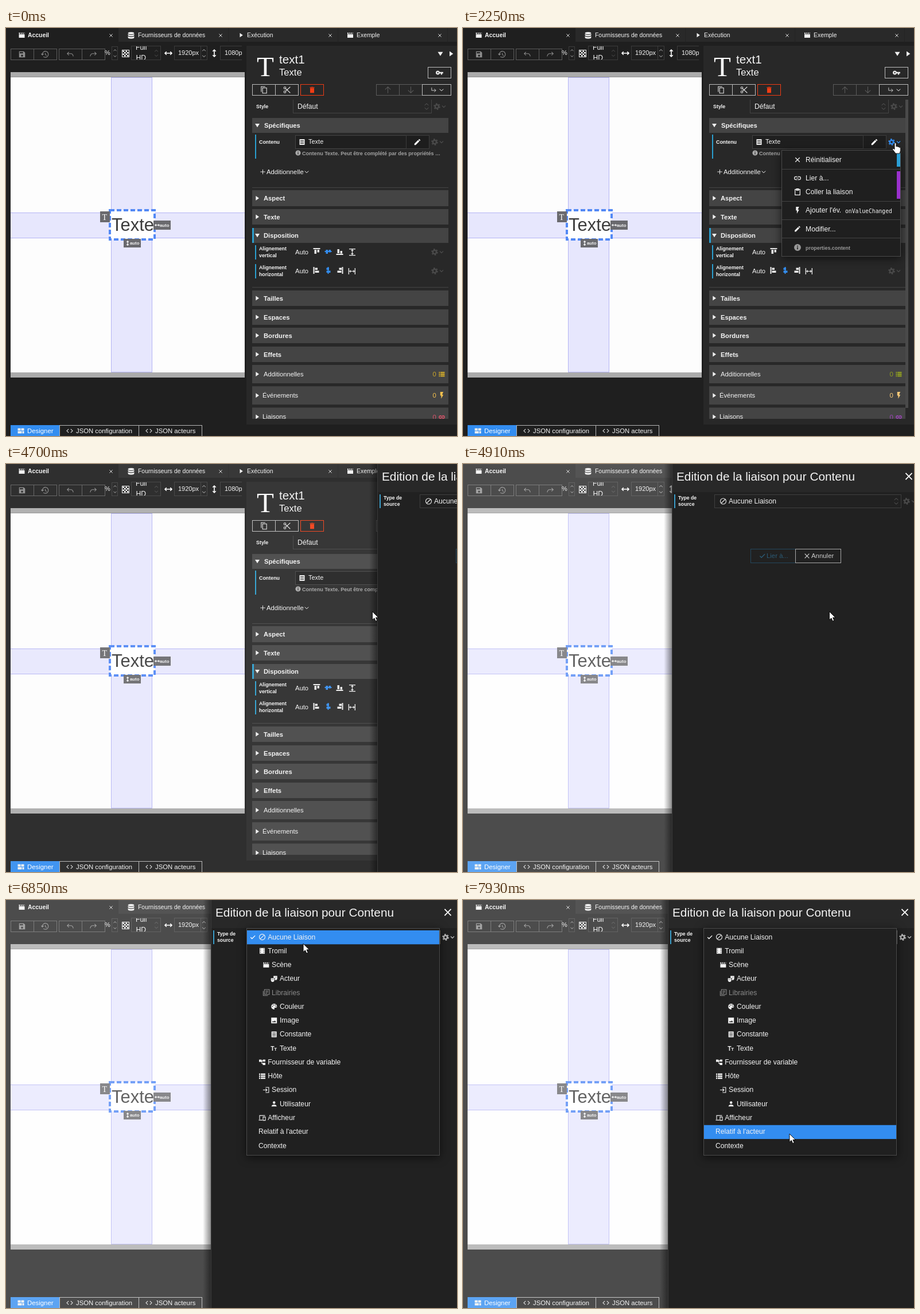
Write an HTML page that moves like this. It is 786x712 px and loops after 8000 ms.

```html
<!DOCTYPE html>
<html lang="fr">
<head>
<meta charset="utf-8">
<title>Liaison</title>
<style>
html,body{margin:0;width:100%;height:100%;overflow:hidden;background:#1f1f1f}
svg{display:block;width:786px;height:712px;font-family:"Liberation Sans",Arial,sans-serif}
text{white-space:pre}
.pop{filter:drop-shadow(0 3px 8px rgba(0,0,0,.6))}
</style>
</head>
<body>
<svg id="stage" viewBox="0 0 786 712" xmlns="http://www.w3.org/2000/svg"></svg>
<script>
const LOOP = 8000, BLUE = '#338df0', PURPLE = '#9a30cd', DIM = '#4a4a4a', ROW = 24.27;

// Icons on a 24 unit grid; those in LINES are stroked.
const ICONS = {
  close: 'M5 5L19 19M19 5L5 19',
  clap: 'M2 9h20v12H2zM2 3h3l2 5H2zM8 3h3l2 5h-3zM14 3h3l2 5h-3zM20 3h2v5z',
  db: 'M12 1c6 0 10 1.6 10 3.6S18 8.2 12 8.2 2 6.6 2 4.600 6 1 12 1zM2 7c1 2 5 3.200 10 3.200S21 9 22 7v4c0 2-4 3.600-10 3.600S2 13 2 11zM2 14c1 2 5 3.200 10 3.200S21 16 22 14v5c0 2-4 3.600-10 3.600S2 21 2 19z',
  save: 'M3 3h14l4 4v14H3zM5 5v4h10V5zM12 13a3 3 0 1 0 0 6a3 3 0 1 0 0-6z',
  history: 'M4 12a9 9 0 1 1 3 6.500M1 10l3 4 4-4M13 8v5l4 2.500',
  undo: 'M8 5L3 10l5 5M3 10h11c4 0 6 3 7 8',
  redo: 'M16 5l5 5-5 5M21 10H10c-4 0-6 3-7 8',
  horiz: 'M1 12H23M6 7L1 12l5 5M18 7l5 5-5 5',
  vert: 'M12 1V23M7 6l5-5 5 5M7 18l5 5 5-5',
  copy: 'M8 6h12v16H8zM4 18V2h12',
  cut: 'M3 6a3 3 0 1 0 6 0a3 3 0 1 0-6 0M3 18a3 3 0 1 0 6 0a3 3 0 1 0-6 0M8 8L22 21M8 16L22 3',
  trash: 'M5 4h3.500l1-1h5l1 1H19v2H5zM6 7h12v14H6z',
  key: 'M7 6a6 6 0 1 0 5.600 8H16v4h4v-4h3v-4H12.600A6 6 0 0 0 7 6zM7 10a2 2 0 1 1 0 4a2 2 0 1 1 0-4z',
  up: 'M12 22V3M4 11l8-8 8 8',
  down: 'M12 2V21M4 13l8 8 8-8',
  into: 'M4 3v11h16M14 8l6 6-6 6',
  pencil: 'M3 17.200V21h3.800L17.800 10 14 6.200zM15.100 5.100l3.800 3.800 2.200-2.500-3.500-3.500z',
  doc: 'M3 2h18v20H3zM6 6v2h12V6zM6 11v2h12v-2zM6 16v2h12v-2z',
  info: 'M12 1a11 11 0 1 0 0 22a11 11 0 1 0 0-22zM10.500 6h3v3h-3zM10.500 11h3v7h-3z',
  plus: 'M12 2V22M2 12H22',
  link: 'M11 7H7a5 5 0 0 0 0 10h4M13 7h4a5 5 0 0 1 0 10h-4M8 12h8',
  clip: 'M4 4h16v18H4zM8.500 2h7v5h-7z',
  bolt: 'M7 1v12h3v10l7-13h-4l4-9z',
  check: 'M3 12l6 6L22 5',
  ban: 'M12 2a10 10 0 1 0 0 20a10 10 0 1 0 0-20zM5 19L19 5',
  film: 'M3 2h18v20H3zM5 4v3h2V4zM5 10v3h2v-3zM5 16v3h2v-3zM17 4v3h2V4zM17 10v3h2v-3zM17 16v3h2v-3z',
  masks: 'M10 2h13v9c0 4-3 6-6 6l-2-1V9h-5zM1 10h12v7c0 4-3 6-6 6s-6-2-6-6zM4 14v2h2v-2zM8 14v2h2v-2zM17 6v2h2V6z',
  books: 'M6 1h17v17H6zM2 6v16h16M10 6h9M10 10h9M10 14h5',
  palette: 'M12 2a10 10 0 0 0 0 20c2 0 2-2 1-3s0-3 2-3h3c3 0 4-2 4-5 0-5-5-9-10-9zM5 10h3v3H5zM8 5h3v3H8zM14 5h3v3h-3zM17 10h3v3h-3z',
  image: 'M2 2h20v20H2zM5 18h14l-4.500-6-3.500 4.500-2.500-3z',
  tree: 'M1 3h9v8H1zM14 3h9v7h-9zM14 14h9v8h-9zM10 6h4v2h-2v8h2v2h-4V6z',
  rows: 'M1 3h4v5H1zM7 3h16v5H7zM1 10h4v5H1zM7 10h16v5H7zM1 17h4v5H1zM7 17h16v5H7z',
  login: 'M10 3h11v18H10M1 12h14M10 7l5 5-5 5',
  user: 'M12 3a4.500 4.500 0 1 0 0 9a4.500 4.500 0 1 0 0-9zM3 21c0-9 18-9 18 0z',
  screens: 'M22 4H3v14M0 20h13M15 9h8v12h-8z',
  grid: 'M1 3h10v8H1zM13 3h10v8H13zM1 13h14v8H1zM17 13h6v8h-6z',
  code: 'M8 5l-7 7 7 7M16 5l7 7-7 7',
  chev: 'M2 8l10 9L22 8',
  chevUp: 'M2 16l10-9 10 9',
  tipD: 'M0 3h24L12 22z',
  tipR: 'M4 0l17 12L4 24z'
};
const LINES = new Set('close history undo redo horiz vert copy cut up down into plus link clip check ban books login screens code chev chevUp'.split(' '));

const ic = (name, x, y, s, c = '#f0f0f0', w = 2.2) =>
  `<path transform="translate(${x - s / 2} ${y - s / 2}) scale(${s / 24})" d="${ICONS[name]}" ` +
  (LINES.has(name) ? `fill="none" stroke="${c}" stroke-width="${w}"/>` : `fill="${c}" fill-rule="evenodd"/>`);
const fill = (x, y, w, h, c, more = '') => `<rect x="${x}" y="${y}" width="${w}" height="${h}" fill="${c}" ${more}/>`;
const box = (x, y, w, h, line, c = 'none', more = '') =>
  fill(x + .5, y + .5, w - 1, h - 1, c, `stroke="${line}" ${more}`);
const tx = (x, y, s, str, c = '#f4f4f4', more = '') =>
  `<text x="${x}" y="${y}" font-size="${s}" fill="${c}" ${more}>${str}</text>`;
const bold = (x, y, s, str, c) => tx(x, y, s, str, c, 'font-weight="700"');
const serif = (x, y, s, str) => tx(x, y, s, str, '#fff', 'font-family="Liberation Serif,serif"');
const cog = (x, y, id = '') =>
  `<g ${id && `id="${id}"`} stroke="${DIM}" fill="none"><circle cx="${x}" cy="${y}" r="3.100" stroke-width="2.400"/>` +
  `<circle cx="${x}" cy="${y}" r="5" stroke-width="1.800" stroke-dasharray="2.600 2.636"/>` +
  `<path d="M${x + 9} ${y - 1.500}l3 3 3-3" stroke-width="1.300"/></g>`;
const spin = (x, y, d, c, s = 7) => ic('chevUp', x, y - d, s, c, 3) + ic('chev', x, y + d, s, c, 3);

function tabs() {
  let s = fill(196, 0, 590, 24, '#292929') + ic('clap', 27.5, 12.5, 12) + bold(38, 16, 10.4, 'Accueil') +
    ic('db', 218, 13, 13) + ic('tipR', 410, 12.5, 7.5) + ic('clap', 600, 12.5, 12);
  [[230, 'Fournisseurs de données'], [420, 'Exécution'], [611, 'Exemple']].forEach(([x, n]) => s += tx(x, 16, 10.4, n));
  [183, 374, 565, 756].forEach(x => s += ic('close', x, 13, 9, '#ddd', 2.6));
  [387, 578, 769].forEach(x => s += fill(x, 0, 1, 24, '#242424'));
  return s;
}

function toolbar() {
  let s = '';
  ['save', 'history', 'undo', 'redo'].forEach((n, i) => {
    const x = [8, 48, 92, 132][i];
    s += box(x, 36, 41, 20, '#5c5c5c') + ic(n, x + 20, 46, 14, '#8c8c8c', 1.8);
  });
  s += tx(172, 47, 11, '%') + box(184, 32, 11, 24, '#3c3c3c') + spin(190, 44, 5, '#ccc', 6);
  s += box(202, 38, 13, 13, '#eee', '#222');
  for (let i = 0; i < 16; i++) if ((i + (i >> 2)) % 2 == 0) s += fill(203.5 + i % 4 * 2.5, 39.5 + (i >> 2) * 2.5, 2.5, 2.5, '#fff');
  s += box(218, 31, 52, 25, '#3c3c3c') +
    '<g clip-path="url(#res)">' + tx(226, 38, 12.1, 'Full') + tx(226.5, 56, 12.1, 'HD') + '</g>' + spin(262, 44, 4, '#555');
  s += ic('horiz', 283, 44, 13, '#fff', 3) + box(293, 31, 58, 25, '#3c3c3c') + fill(339, 32, 1, 23, '#3c3c3c') +
    tx(300, 47, 11, '1920px') + spin(345, 44, 5, '#ccc') + ic('vert', 363, 44, 13, '#fff', 3) +
    box(373, 31, 60, 25, '#3c3c3c') + tx(381, 47, 11, '1080px');
  return `<g clip-path="url(#bar)">${s}</g>`;
}

function canvas() {
  const band = (x, y, w, h) => box(x, y, w, h, '#b4b4f4', '#e7e7fd');
  return fill(8, 77, 408, 533, '#ababab') + fill(8, 85, 408, 1, '#8f8f8f') + fill(8, 86, 408, 515, '#fdfdfd') +
    `<g clip-path="url(#page)">${band(0, 322, 420, 45)}${band(183, 86, 72, 515)}${fill(184, 323, 70, 43, '#e7e7fd')}</g>` +
    fill(181, 318, 78, 51, '#fff') +
    '<rect x="181" y="318" width="78" height="51" fill="none" stroke="#5389f5" stroke-width="4" stroke-dasharray="8 4"/>' +
    tx(184, 354, 31, 'Texte', '#3c3c3c') +
    fill(164, 320, 17, 19, '#6a6a6e') + serif(167.5, 335, 14, 'T') +
    fill(257, 336, 30, 16, '#6a6a6e') + ic('horiz', 263.5, 344, 8, '#fff', 3.5) + bold(268, 347, 7.8, 'auto') +
    fill(205, 368, 30, 15, '#6a6a6e') + ic('vert', 212, 375.5, 8, '#fff', 3.5) + bold(216, 378, 7.8, 'auto');
}

function footer() {
  return fill(8, 693, 86, 19, BLUE) + ic('grid', 26, 703, 12) + tx(37, 707, 11.4, 'Designer', '#fff') +
    box(93, 693, 139, 25, '#b5b5b5') + ic('code', 111, 703, 11) + tx(122, 707, 11.3, 'JSON configuration') +
    box(231, 693, 111, 25, '#b5b5b5') + ic('code', 249, 703, 11) + tx(260, 707, 11.3, 'JSON acteurs');
}

function alignIcons(y, turned) {
  const bars = (x, edge, c) => fill(x - 6, y + edge, 12, 2, c) +
    fill(x - 4, edge > 0 ? y - 4 : y - (edge ? 3 : 4), 3.5, edge ? 7 : 9, c) +
    fill(x + 1, edge > 0 ? y - 1 : y - (edge ? 3 : 2), 3.5, edge ? 4.5 : 6, c);
  const one = (x, e, c) => `<g ${turned ? `transform="rotate(-90 ${x} ${y})"` : ''}>${bars(x, e, c)}</g>`;
  const span = `<g transform="rotate(${turned ? 90 : 0} 603 ${y + 1})">${fill(598, y - 5, 11, 1.3, '#eee')}${fill(598, y + 6, 11, 1.3, '#eee')}${ic('vert', 603.5, y + 1, 9, '#eee', 3)}</g>`;
  return one(541.5, -6, '#eee') + one(561.5, -1, BLUE) + one(581.5, 4, '#eee') + span;
}

function section(y, h, name, open, light) {
  return fill(429, y, 342, h, '#444') + ic(open ? 'tipD' : 'tipR', 438, y + h / 2, 8) +
    (light || bold)(name[0] == 'É' || name[0] == 'L' ? 447 : 449, y + h / 2 + 4, 11.2, name);
}

function panel() {
  let s = fill(419, 31, 367, 661, '#282828') + serif(437, 84, 49, 'T') +
    tx(476, 62, 20.6, 'text1') + tx(476, 83, 16.6, 'Texte') + ic('tipD', 757, 45, 9) + ic('tipR', 776, 45, 9);
  [['key', 735, 68, 41], ['copy', 429, 98, 41], ['cut', 469, 98, 41], ['trash', 513, 98, 41, '#f03c14'],
   ['up', 645, 98, 41, '#5c5c5c'], ['down', 685, 98, 41, '#5c5c5c'], ['into', 725, 98, 51]].forEach(([n, x, y, w, c]) =>
    s += box(x, y, w, 20, c || '#bdbdbd') + ic(n, x + 20.5, y + 10, n == 'into' ? 11 : 14, c || '#e8e8e8', 1.8));
  s += ic('chev', 759, 108, 8, '#eee', 3);

  let b = box(500, 120, 242, 29, '#444') + bold(436, 140, 8.9, 'Style') + tx(508, 141, 12.1, 'Défaut') +
    spin(733, 137, 3.5, '#5a5a5a', 8) + cog(751, 137);
  b += section(157, 26, 'Spécifiques', 1).replace('x="449"', 'x="450"') + fill(434, 186, 2, 42, '#2a9fd0') +
    bold(441, 202, 8.9, 'Contenu') + box(504, 187, 194, 24, '#444', '#1f1f1f') + ic('doc', 516, 199, 12) +
    tx(527, 202, 11, 'Texte') + box(697, 187, 41, 24, '#3c3c3c', '#1d1d1d') + ic('pencil', 717, 199, 14, '#fff') +
    cog(747, 199, 'gear') + ic('info', 509, 218, 10, '#aaa') +
    bold(516, 222, 9.05, 'Contenu Texte. Peut être complété par des propriétés …', '#a2a2a2') +
    ic('plus', 447.5, 251, 10) + tx(454, 255, 11.3, 'Additionnelle') + ic('chev', 524, 251, 8, '#eee', 3) +
    fill(429, 278, 342, 1, '#444') + fill(429, 452, 342, 1, '#444');
  [[283, 28, 'Aspect'], [316, 27, 'Texte'], [349, 26, 'Disposition', 1], [458, 27, 'Tailles'], [491, 27, 'Espaces'],
   [523, 27, 'Bordures'], [556, 27, 'Effets']].forEach(a => b += section(...a));
  b += fill(429, 349, 3, 26, '#2a9fd0');
  ['vertical', 'horizontal'].forEach((n, i) => {
    const y = 391 + 33 * i;
    b += fill(434, y - 12, 2, 25, '#2a9fd0') + bold(441, y - 3, 8.8, 'Alignement') + bold(441, y + 9, 8.8, n) +
      tx(504, y + 4, 11.2, 'Auto') + alignIcons(y - 1, i) + cog(747, y);
  });
  ['Additionnelles', 'Événements', 'Liaisons'].forEach((n, i) => {
    const y = 588 + 37.2 * i;
    b += section(y, 32, n, 0, tx) + `<g id="count${i}"></g>`;
  });
  return s + `<g clip-path="url(#list)">${b}</g>` + fill(771, 125, 5, 538, DIM, 'id="scroll"');
}

function menu() {
  let s = box(555, 213, 208, 186, DIM, '#1f1f1f');
  [246, 302, 334, 366].forEach(y => s += fill(556, y, 206, 1, '#444'));
  s += fill(756, 218, 6, 24, '#2a9fd6') + fill(756, 250, 6, 48, PURPLE) + fill(556, 0, 206, 24, PURPLE, 'id="menuHit"');
  [['close', 230, 'Réinitialiser'], ['link', 262, 'Lier à...'], ['clip', 286, 'Coller la liaison'],
   ['bolt', 318, "Ajouter l'év."], ['pencil', 350.5, 'Modifier...']].forEach(([n, y, t]) =>
    s += ic(n, 583, y, 13) + tx(597, y + 4, 12.16, t));
  s += tx(666, 323, 9.73, 'onValueChanged', '#f4f4f4', 'font-family="DejaVu Sans Mono,monospace"');
  return s + ic('info', 583, 383, 13, '#999') + bold(597, 386.5, 8.9, 'properties.content', '#999');
}

const CHOICES = [['ban', 0, 'Aucune Liaison'], ['film', 0, 'Tromil'], ['clap', 1, 'Scène'], ['masks', 3, 'Acteur'],
  ['books', 1, 'Librairies'], ['palette', 3, 'Couleur'], ['image', 3, 'Image'], ['doc', 3, 'Constante'], ['tt', 3, 'Texte'],
  ['tree', 0, 'Fournisseur de variable'], ['rows', 0, 'Hôte'], ['login', 1, 'Session'], ['user', 3, 'Utilisateur'],
  ['screens', 0, 'Afficheur'], ['', 0, "Relatif à l'acteur"], ['', 0, 'Contexte']];

function dropdown() {
  let s = box(419, 49, 337, 397, DIM, '#202020') + fill(420, 53, 335, 24.3, BLUE, 'id="hit"') + ic('check', 430, 65, 10, '#fff', 3);
  CHOICES.forEach(([n, depth, t], i) => {
    const x = 446.5 + depth * 6.9, y = 64.6 + ROW * i, c = i == 4 ? '#8a8a8a' : '#f4f4f4';
    if (n == 'tt') s += bold(x - 6, y + 4, 10.5, 'T', c) + bold(x, y + 4, 8, 'T', c);
    else if (n) s += ic(n, x, y, 12, c);
    s += tx(n ? x + 9.7 : 440, y + 3.9, 12.16, t, c);
  });
  return s;
}

function dialog() {
  return fill(343, 0, 14, 712, 'url(#shade)') + fill(357, 0, 440, 712, '#212121') + fill(357, 0, 440, 49, '#282828') +
    fill(357, 0, 1, 712, '#3a3a3a') + tx(365, 28.5, 20.8, 'Edition de la liaison pour Contenu') +
    ic('close', 770, 21.5, 19, '#fff', 2.3) + fill(361, 53, 2, 24, '#3a9cc8') +
    bold(368, 62, 8.7, 'Type de') + bold(368, 73, 8.7, 'source') +
    box(431, 53, 326, 24, '#3f3f3f', '#212121', 'id="select"') + ic('ban', 446.5, 65, 12) +
    tx(456, 68.5, 12.16, 'Aucune Liaison') + spin(748, 65, 3.5, '#5a5a5a', 8) + cog(766, 65, 'cog') +
    box(494, 148, 79, 25, '#24475c') + ic('check', 514.5, 160.5, 11, '#2b5b76', 3) + tx(522, 164, 11.4, 'Lier à...', '#2b5b76') +
    box(572, 148, 80, 25, '#a8a8a8') + ic('close', 592.5, 160.5, 13, '#ddd', 2) + tx(600, 164, 11.4, 'Annuler', '#ccc') +
    `<g id="drop" class="pop">${dropdown()}</g>`;
}

const clip = (id, x, y, w, h) => `<clipPath id="${id}">${fill(x, y, w, h, '#000')}</clipPath>`;
document.getElementById('stage').innerHTML =
  `<defs>${clip('bar', 0, 25, 411, 40)}${clip('res', 219, 32, 42, 23)}${clip('page', 8, 86, 408, 515)}${clip('list', 419, 125, 367, 557)}
  <linearGradient id="shade"><stop offset="0" stop-opacity="0"/><stop offset="1" stop-opacity=".45"/></linearGradient></defs>` +
  fill(0, 0, 786, 712, '#1f1f1f') + tabs() + toolbar() + canvas() + footer() + panel() +
  `<g id="menu" class="pop">${menu()}</g>` + fill(0, 0, 786, 712, '#fff', 'id="veil"') + `<g id="dialog">${dialog()}</g>
  <path id="arrow" d="M0 0V14.500L3.400 11.400 5.700 16.700 8.300 15.600 6 10.500H10.500Z" fill="#fff" stroke="#000" stroke-width=".9"/>
  <path id="hand" d="M0 1.500C0 -.5 3 -.5 3 1.500V6.500C4 5.500 5.800 6 5.900 7 7 6.300 8.400 7 8.500 8 9.700 7.500 10.700 8.300 10.700 9.500V13L9 18.500H2L-3 12C-4 10.200-2.200 9-1 10.200L0 11.300Z" fill="#fff" stroke="#000" stroke-width=".9"/>`;

const $ = id => document.getElementById(id);
const show = (id, on) => $(id).setAttribute('visibility', on ? 'visible' : 'hidden');
const place = (id, x, y) => $(id).setAttribute('transform', `translate(${x} ${y})`);

// Pointer moves: start, end, steps, from x, y, to x, y
const MOVES = [
  [1030, 1500, 8, 777, 222, 753, 204],
  [1640, 1640, 1, 753, 204, 752, 202],
  [1900, 1900, 1, 752, 202, 752.5, 200.5],
  [3310, 3970, 11, 752, 201, 638.5, 257.5],
  [5500, 6240, 12, 638.5, 257.5, 515, 60],
  [6770, 7530, 12, 515, 60, 556, 280],
  [7600, 7930, 6, 556, 280, 569, 408]
];
// Dialog slide: time, offset, veil
const SLIDE = [[4700, 290, .07], [4770, 110, .15], [4840, 34, .19], [4910, 7, .2], [4970, 0, .2]];

function pointer(t) {
  const m = MOVES.filter(m => t >= m[0]).pop();
  if (!m) return null;
  const [a, b, n, x0, y0, x1, y1] = m;
  const k = n > 1 ? Math.min(n - 1, Math.floor((t - a) * (n - 1) / (b - a) + 1e-6)) : 0;
  const p = (k + 1) / n, e = p * p * (3 - 2 * p);
  return [x0 + (x1 - x0) * e, y0 + (y1 - y0) * e];
}

let tint;
function counts(late) {
  if (tint === late) return;
  tint = late;
  [['rows', late ? '#8d9c22' : '#c9a52c', 604], ['bolt', late ? '#f5c878' : '#f2c04e', 641], ['link', late ? '#9c46b8' : '#d9546a', 679]]
    .forEach(([n, c, y], i) => $('count' + i).innerHTML = tx(743.5, y + 4, 11.4, '0', c) + ic(n, 759.5, y, n == 'bolt' ? 13 : 11, c, 3));
}

function draw(t) {
  const p = pointer(t), [x, y] = p || [0, 0];
  const onGear = p && t < 3400 && x < 762;
  show('arrow', p && !onGear);
  show('hand', onGear);
  place('arrow', x, y);
  place('hand', x - .5, y);
  counts(t >= 2250);

  $('scroll').setAttribute('opacity', t < 640 ? 0 : t < 700 ? .5 : 1);
  $('scroll').setAttribute('fill', p && t < 1500 && x > 768 ? '#666' : DIM);
  $('gear').setAttribute('stroke', onGear || t >= 2250 && t < 4700 ? BLUE : p && t < 2250 ? '#aaa' : DIM);

  const open = t >= 2250 && t < 4700, first = y >= 218 && y < 243, second = y >= 249 && y < 274;
  $('menu').style.display = open ? '' : 'none';
  $('menuHit').style.display = x < 762 && (first || second) ? '' : 'none';
  $('menuHit').setAttribute('y', first ? 218 : 250);
  $('menuHit').setAttribute('fill', first ? '#2a9fd6' : PURPLE);

  const s = SLIDE.filter(s => t >= s[0]).pop();
  $('dialog').style.display = s ? '' : 'none';
  place('dialog', s ? s[1] : 0, 0);
  $('veil').setAttribute('opacity', s ? s[2] : 0);
  const over = t >= 6370 || t >= 5500 && y < 77;
  $('cog').setAttribute('stroke', over ? '#bbb' : DIM);
  $('select').setAttribute('stroke', over ? '#777' : '#3f3f3f');

  $('drop').style.display = t >= 6370 ? '' : 'none';
  $('drop').style.opacity = t < 6440 ? .5 : 1;
  const row = Math.floor((y - 53) / ROW);
  $('hit').style.display = row == 4 ? 'none' : '';
  $('hit').setAttribute('y', 53 + ROW * Math.max(0, row));
}

const begin = performance.now();
function tick() {
  draw((performance.now() - begin) % LOOP);
  requestAnimationFrame(tick);
}
tick();
</script>
</body>
</html>
```
